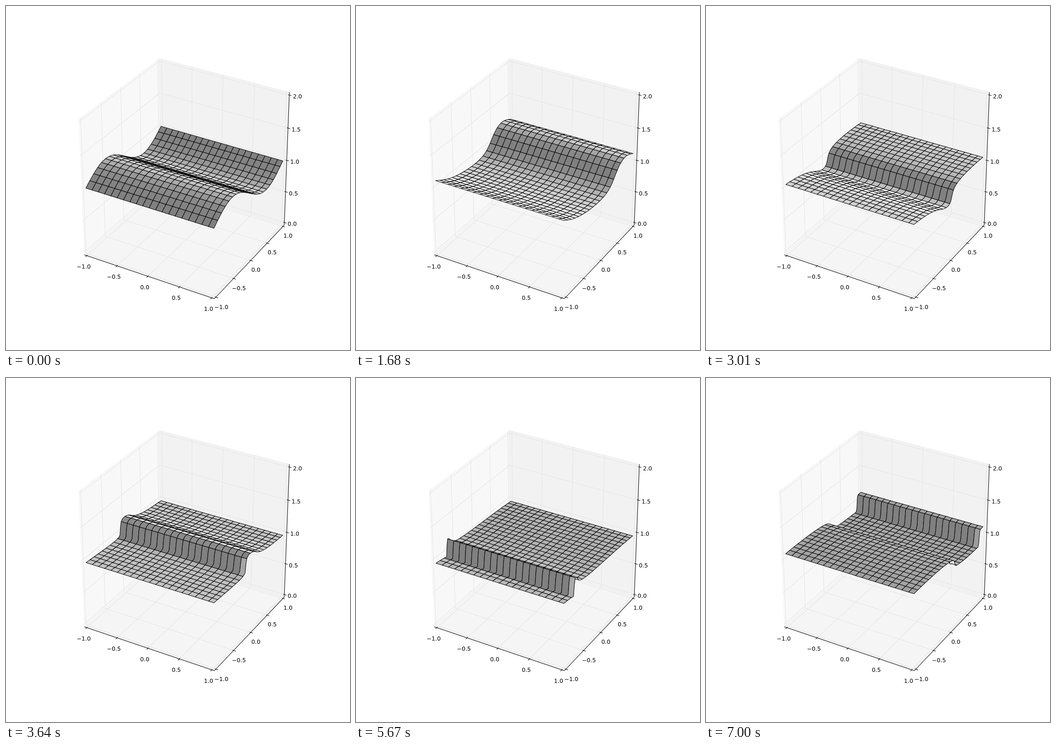
An HTML page with a canvas for the animation above (7.07 s loop, 748 by 748 pixels).

```html
<!DOCTYPE html>
<html>
<head>
<meta charset="utf-8">
<style>
  html, body { margin: 0; width: 100%; height: 100%; overflow: hidden; background: #fff; }
  canvas { display: block; width: 748px; height: 748px; }
</style>
</head>
<body>
<canvas id="stage" width="748" height="748"></canvas>
<script>
const ctx = document.getElementById('stage').getContext('2d');
const FRAMES = 101, FRAME_MS = 70;
const SPANS = 99, STRIDE = 5;   // sample intervals per side, intervals per patch
const LINE = 1.04;

// ---- Shallow water, periodic in y: depth h and momentum m ----
const G = 9.81, CELLS = 2 * SPANS, DX = 2 / CELLS, DT = 0.001, STEPS_PER_FRAME = 10;

const vanLeer = (a, b) => a * b > 0 ? 2 * a * b / (a + b) : 0;

function slopes(q) {
  return q.map((v, i) => vanLeer(v - q[(i + CELLS - 1) % CELLS], q[(i + 1) % CELLS] - v));
}

function hll(hl, ml, hr, mr) {
  const ul = ml / hl, ur = mr / hr, cl = Math.sqrt(G * hl), cr = Math.sqrt(G * hr);
  const sl = Math.min(ul - cl, ur - cr), sr = Math.max(ul + cl, ur + cr);
  const blend = (fl, fr, ql, qr) => (sr * fl - sl * fr + sl * sr * (qr - ql)) / (sr - sl);
  return [
    blend(ml, mr, hl, hr),
    blend(ml * ul + G * hl * hl / 2, mr * ur + G * hr * hr / 2, ml, mr)
  ];
}

function euler([h, m]) {
  const sh = slopes(h), sm = slopes(m);
  const flux = h.map((_, i) => {
    const j = (i + 1) % CELLS;
    return hll(h[i] + sh[i] / 2, m[i] + sm[i] / 2, h[j] - sh[j] / 2, m[j] - sm[j] / 2);
  });
  return [h, m].map((q, k) =>
    q.map((v, i) => v - DT / DX * (flux[i][k] - flux[(i + CELLS - 1) % CELLS][k])));
}

function heun(state) {
  const next = euler(euler(state));
  return state.map((q, k) => q.map((v, i) => (v + next[k][i]) / 2));
}

function simulate() {
  let state = [
    Array.from({ length: CELLS }, (_, i) => 1 - 0.2 * Math.sin(Math.PI * (i * DX - 1))),
    Array(CELLS).fill(1)
  ];
  const profiles = [];
  for (let f = 0; f < FRAMES; f++) {
    const h = state[0];
    profiles.push(Array.from({ length: SPANS + 1 }, (_, i) => h[2 * i % CELLS]));
    for (let s = 0; s < STEPS_PER_FRAME; s++) state = heun(state);
  }
  return profiles;
}

// ---- Camera: unit box centred on the origin, azimuth -60, elevation 30 ----
const S3 = Math.sqrt(3);
const depth = ([x, y, z]) => S3 / 4 * x - 0.75 * y + 0.5 * z;

function project(p) {
  const [x, y, z] = p, d = 10 - depth(p);
  return [
    93.5 + 3133.5 * (0.095 + (S3 / 2 * x + 0.5 * y) / d),
    673.2 - 3234.6 * (0.095 + (-0.25 * x + S3 / 4 * y + S3 / 2 * z) / d)
  ];
}

function trace(points) {
  ctx.beginPath();
  points.forEach(p => ctx.lineTo(...project(p)));
}

function line(color, ...points) {
  trace(points);
  ctx.strokeStyle = color;
  ctx.stroke();
}

function polygon(fill, stroke, points) {
  trace(points);
  ctx.closePath();
  ctx.fillStyle = fill;
  ctx.strokeStyle = stroke;
  ctx.fill();
  ctx.stroke();
}

// ---- Axes ----
const E = 0.5 + 1 / 48;   // walls stand slightly outside the data box
const TICKS = [-0.5, -0.25, 0, 0.25, 0.5];

function pane(gray, ...corners) {
  const color = `rgba(${gray},${gray},${gray},0.5)`;
  polygon(color, color, corners);
}

function label(text, p) {
  const [x, y] = project(p);
  ctx.fillStyle = '#000';
  ctx.fillText(text, x, y + 10);
}

function drawAxes() {
  pane(242, [-E, -E, -E], [-E, E, -E], [-E, E, E], [-E, -E, E]);
  pane(230, [-E, E, -E], [E, E, -E], [E, E, E], [-E, E, E]);
  pane(236, [-E, -E, -E], [E, -E, -E], [E, E, -E], [-E, E, -E]);

  for (const t of TICKS) {
    line('#e5e5e5', [t, -E, -E], [t, E, -E], [t, E, E]);
    line('#e5e5e5', [E, t, -E], [-E, t, -E], [-E, t, E]);
    line('#e5e5e5', [-E, -E, t], [-E, E, t], [E, E, t]);
  }

  line('#000', [-E, -E, -E], [E, -E, -E]);
  line('#000', [E, -E, -E], [E, E, -E]);
  line('#000', [E, E, -E], [E, E, E]);

  const inner = E - 1 / 120, outer = E + 1 / 60, far = E + 0.042;
  for (const t of TICKS) {
    line('#000', [t, -inner, -E], [t, -outer, -E]);
    line('#000', [inner, t, -E], [outer, t, -E]);
    line('#000', [inner, E, t], [outer, E, t]);
    const signed = (2 * t).toFixed(1).replace('-', '\u2212');
    label(signed, [t, -far, -far]);
    label(signed, [far, t, -far]);
    label((2 * t + 1).toFixed(1), [far, far, t]);
  }
}

// ---- Surface ----
const minus = (a, b) => a.map((v, k) => v - b[k]);

// Light from (-1, -1, 0.5) on the plane through three points of the outline.
function patchShade(points) {
  const count = points.length + 1;
  const b = points[Math.floor(count / 3)], c = points[Math.floor(2 * count / 3)];
  const [ux, uy, uz] = minus(points[0], b), [vx, vy, vz] = minus(b, c);
  const nx = uy * vz - uz * vy, ny = uz * vx - ux * vz, nz = ux * vy - uy * vx;
  return (-nx - ny + nz / 2) / Math.hypot(nx, ny, nz);
}

function patchOutline(profile, i, j) {
  const point = (a, b) => [a / SPANS - 0.5, b / SPANS - 0.5, (profile[b] - 1) / 2];
  const iEnd = Math.min(i + STRIDE, SPANS), jEnd = Math.min(j + STRIDE, SPANS);
  const points = [];
  for (let b = j; b < jEnd; b++) points.push(point(i, b));
  for (let a = i; a < iEnd; a++) points.push(point(a, jEnd));
  for (let b = jEnd; b > j; b--) points.push(point(iEnd, b));
  for (let a = iEnd; a > i; a--) points.push(point(a, j));
  return points;
}

function drawSurface(profile) {
  const patches = [];
  for (let i = 0; i < SPANS; i += STRIDE) {
    for (let j = 0; j < SPANS; j += STRIDE) {
      const points = patchOutline(profile, i, j);
      const near = points.reduce((sum, p) => sum + depth(p), 0) / points.length;
      patches.push({ points, near, shade: patchShade(points) });
    }
  }
  const shades = patches.map(p => p.shade);
  const low = Math.min(...shades), high = Math.max(...shades);
  patches.sort((a, b) => a.near - b.near);
  for (const { points, shade } of patches) {
    const gray = Math.round(127.5 * (1 + (shade - low) / (high - low)));
    polygon(`rgb(${gray},${gray},${gray})`, '#000', points);
  }
}

// ---- Playback ----
const profiles = simulate();
let shown = -1;

function draw(frame) {
  ctx.fillStyle = '#fff';
  ctx.fillRect(0, 0, 748, 748);
  ctx.lineWidth = LINE;
  ctx.lineJoin = 'round';
  ctx.font = '12.47px "DejaVu Sans", sans-serif';
  ctx.textAlign = 'center';
  drawAxes();
  drawSurface(profiles[frame]);
}

function tick() {
  const frame = Math.floor(performance.now() / FRAME_MS) % FRAMES;
  if (frame !== shown) draw(shown = frame);
  requestAnimationFrame(tick);
}
tick();
</script>
</body>
</html>
```
